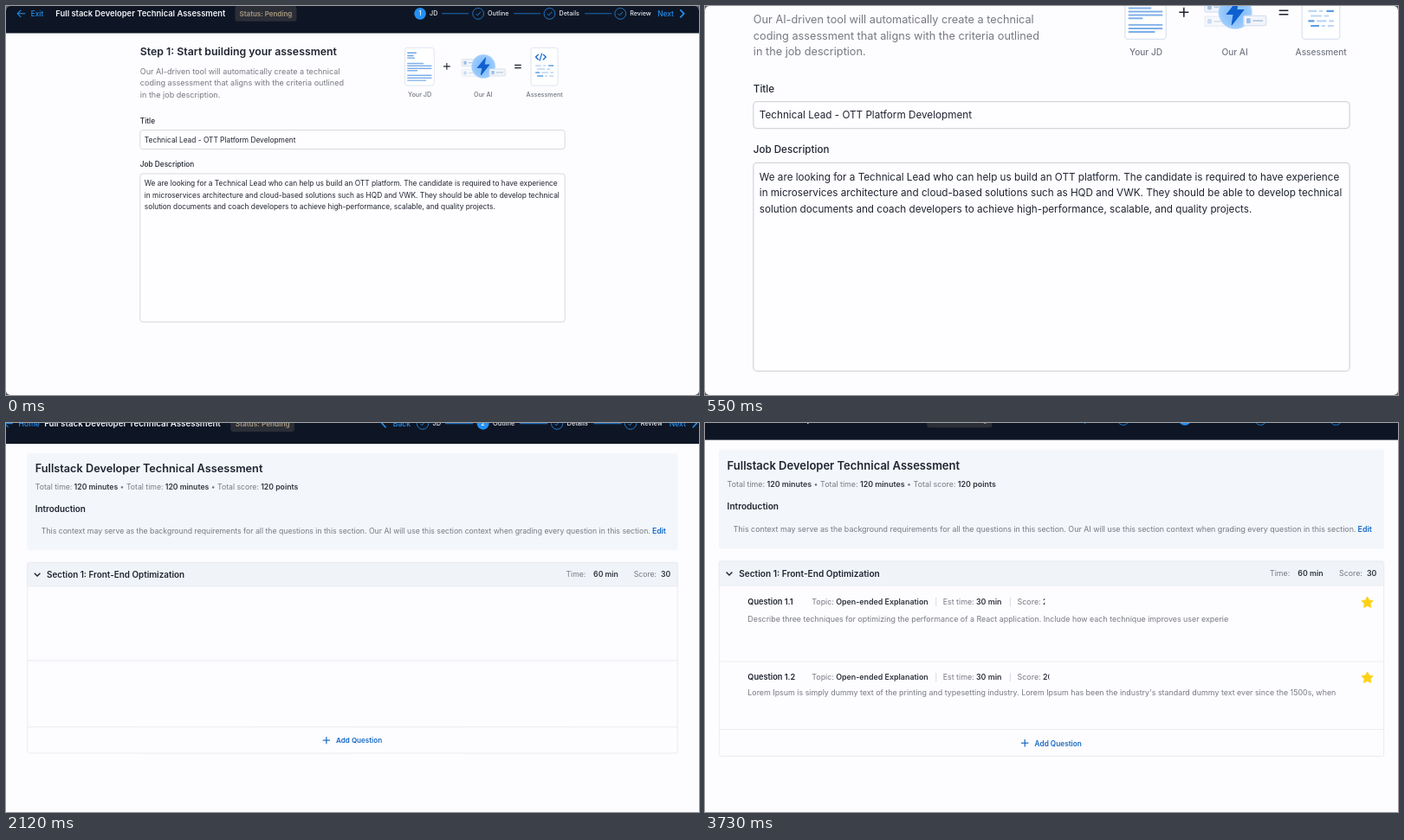
An HTML page with a canvas for the animation above (3760 ms loop, 800x450 px).

```html
<!DOCTYPE html>
<html lang="en">
<head>
<meta charset="utf-8">
<title>Assessment builder</title>
<style>
  html, body { margin: 0; width: 100%; height: 100%; overflow: hidden; background: #fdfcff; }
  canvas { display: block; width: 800px; height: 450px; }
</style>
</head>
<body>
<canvas id="stage" width="800" height="450"></canvas>
<script>
const ctx = document.getElementById('stage').getContext('2d');
const LOOP = 3760, CUT = 1340, WRITE = 2450, NOTICE_END = 3450;
const FINAL_ZOOM = 1.062;
const PAGE = '#fdfcff', INK = '#1f2430', GRAY = '#767a82', BLUE = '#1669c4', BRIGHT = '#2490f2';

// Linear interpolation through [time, value] pairs
function follow(keys, t) {
  for (let i = 1; i < keys.length; i++) {
    const [t0, a] = keys[i - 1], [t1, b] = keys[i];
    if (t < t1) return a + (b - a) * Math.max(0, (t - t0) / (t1 - t0));
  }
  return keys[keys.length - 1][1];
}

function zoomed(scale, draw) {
  ctx.save();
  ctx.translate(400, 225);
  ctx.scale(scale, scale);
  ctx.translate(-400, -225);
  draw();
  ctx.restore();
}

// y is the middle of the capitals; returns the right end
function text(str, x, y, size, color = INK, weight = 400, align = 'left') {
  ctx.font = `${weight} ${size}px Inter, sans-serif`;
  ctx.textAlign = align;
  ctx.fillStyle = color;
  ctx.fillText(str, x, y + size * 0.36);
  return x + ctx.measureText(str).width;
}

// Gray label and strong value on one line
function pair(label, value, x, y, size, gap = 2.3) {
  const end = text(label, x, y, size, GRAY);
  return text(value, end + gap, y, size, '#30343e', 600);
}

function box(x, y, w, h, r, fill, stroke) {
  ctx.beginPath();
  ctx.roundRect(x, y, w, h, r);
  if (fill) { ctx.fillStyle = fill; ctx.fill(); }
  if (stroke) { ctx.strokeStyle = stroke; ctx.lineWidth = 0.9; ctx.stroke(); }
}

function path(points, color, width = 1.2) {
  ctx.beginPath();
  points.forEach(([x, y]) => ctx.lineTo(x, y));
  ctx.strokeStyle = color;
  ctx.lineWidth = width;
  ctx.stroke();
}

function polygon(points, color) {
  ctx.beginPath();
  points.forEach(([x, y]) => ctx.lineTo(x, y));
  ctx.closePath();
  ctx.fillStyle = ctx.strokeStyle = color;
  ctx.lineWidth = 0.8;
  ctx.lineJoin = 'round';
  ctx.fill();
  ctx.stroke();
}

function disc(x, y, r, color) {
  ctx.beginPath();
  ctx.arc(x, y, r, 0, Math.PI * 2);
  ctx.fillStyle = color;
  ctx.fill();
}

function plus(x, y, r, color, width) {
  path([[x - r, y], [x + r, y]], color, width);
  path([[x, y - r], [x, y + r]], color, width);
}

function header(exitLabel, active) {
  ctx.fillStyle = '#0e1625';
  ctx.fillRect(0, -20, 800, 51.6);
  path([[22.5, 9], [13.5, 9]], BRIGHT, 1);
  path([[17.5, 5], [13.5, 9], [17.5, 13]], BRIGHT, 1);
  text(exitLabel, 29, 9, 8.3, BRIGHT, 500);
  text('Full stack Developer Technical Assessment', 57.5, 9, 9.4, '#f1f3f7', 600);
  box(264.5, 0, 71, 18, 3, '#2b2e37');
  text('Status: Pending', 300, 9.5, 7.95, '#a79b80', 600, 'center');
  if (active > 1) {
    path([[437, 4.5], [432.8, 9], [437, 13.5]], BRIGHT, 1.6);
    text('Back', 445, 9, 8.3, BRIGHT, 500);
  }
  ['JD', 'Outline', 'Details', 'Review'].forEach((label, i) => {
    const x = [478, 545, 627.3, 709][i];
    if (i + 1 === active) {
      disc(x, 9, 6.8, BRIGHT);
      text(active, x, 9, 7.2, '#fff', 500, 'center');
    } else {
      ctx.beginPath();
      ctx.arc(x, 9, 6.4, 0, Math.PI * 2);
      ctx.strokeStyle = '#237fd4';
      ctx.lineWidth = 0.9;
      ctx.stroke();
      path([[x - 2.6, 9.2], [x - 0.8, 11], [x + 2.8, 7]], '#2c8ae0', 0.9);
    }
    text(label, x + 11, 9, 7.15, '#e8ebf1', 500);
    if (i < 3) {
      const start = [503, 586, 668][i];
      path([[start, 9], [start + 31, 9]], '#1c6ab9', 1);
    }
  });
  text('Next', 752, 9, 8.3, BRIGHT, 500);
  path([[778, 4.5], [782.4, 9], [778, 13.5]], BRIGHT, 1.6);
}

function snippetCard(x, y, w, alpha) {
  ctx.globalAlpha = alpha;
  box(x, y, w, 8, 1, '#f1f5fb', '#d6e0ee');
  box(x + 2.2, y + 2, 3.4, 4, 0.5, '#9dbfe8');
  path([[x + 7.5, y + 4], [x + w - 2.5, y + 4]], '#b9c8dc', 1.2);
  ctx.globalAlpha = 1;
}

function recipe() {
  box(460.4, 48.5, 33.8, 43.6, 2.5, '#fff', '#dbe4f1');
  [54.4, 57.6, 60.3].forEach((y, i) =>
    path([[463.2, y], [[473.8, 470.5, 472][i], y]], '#6ea5e6', 1.3));
  [66.6, 69.4, 72.3, 74.9, 80.4, 83.3, 86.2].forEach((y, i) =>
    path([[463.2, y], [[482, 491.3, 491.3, 475, 491.3, 491.3, 485][i], y]], '#7fafe8', 1.4));
  plus(508.8, 70, 3.9, INK, 1.1);

  snippetCard(526, 61.8, 18, 1);
  snippetCard(526, 73.5, 17, 0.5);
  const glow = ctx.createRadialGradient(551, 70, 8, 551, 70, 14.5);
  glow.addColorStop(0, '#8cc2fb');
  glow.addColorStop(0.8, '#9fcdfc');
  glow.addColorStop(0.9, '#d5e9fd');
  glow.addColorStop(1, '#e8f3fe00');
  disc(551, 70, 14.5, glow);
  snippetCard(558, 73, 18.3, 1);
  polygon([[553.5, 59.8], [544, 71.6], [549.6, 71.6], [548.2, 80.2], [557.9, 68], [552.2, 68]], '#0e60cf');

  path([[587, 68.5], [594.6, 68.5]], INK, 1.1);
  path([[587, 71.7], [594.6, 71.7]], INK, 1.1);

  box(605.9, 48.5, 31, 43.6, 2.5, '#fff', '#dbe4f1');
  path([[614.6, 56], [611.4, 59.2], [614.6, 62.4]], '#1669d2', 1.4);
  path([[618.6, 54.8], [615.8, 63.6]], '#1669d2', 1.2);
  path([[619.8, 56], [623, 59.2], [619.8, 62.4]], '#1669d2', 1.4);
  [[611, 7, 69], [620, 3, 69], [626, 6, 69], [613, 9, 73], [624, 4, 73],
   [611, 5, 77.2], [618, 8, 77.2], [628, 4, 77.2], [613, 7, 81.2], [622, 3, 81.2], [627, 5, 81.2]]
    .forEach(([x, w, y], i) => path([[x, y], [x + w, y]], i % 3 === 2 ? '#5b9ce6' : '#bcd6f5', 1.5));

  const caption = (str, x) => text(str, x, 102.8, 7.2, '#737984', 500, 'center');
  caption('Your JD', 477.6);
  caption('Our AI', 550.6);
  caption('Assessment', 621.5);
}

function jobPage() {
  header('Exit', 1);
  text('Step 1: Start building your assessment', 155, 53, 12.3, INK, 600);
  ['Our AI-driven tool will automatically create a technical',
   'coding assessment that aligns with the criteria outlined',
   'in the job description.']
    .forEach((line, i) => text(line, 155, 75.6 + i * 13.4, 9.06, GRAY));
  recipe();
  text('Title', 155, 132.7, 8.25, INK, 500);
  box(155, 143.6, 490, 22, 3, '#fefdff', '#d3d6dc');
  text('Technical Lead - OTT Platform Development', 160, 154.7, 8.33);
  text('Job Description', 155, 183, 8.25, INK, 500);
  box(155, 194, 490, 171.5, 3, '#fefdff', '#d3d6dc');
  ['We are looking for a Technical Lead who can help us build an OTT platform. The candidate is required to have experience',
   'in microservices architecture and cloud-based solutions such as HQD and VWK. They should be able to develop technical',
   'solution documents and coach developers to achieve high-performance, scalable, and quality projects.']
    .forEach((line, i) => text(line, 160, 205.4 + i * 13.4, 8.32));
}

// Reveals from the left edge at a steady speed
function wipe(y, speed, elapsed, draw) {
  ctx.save();
  ctx.beginPath();
  ctx.rect(49, y - 9, speed * elapsed, 18);
  ctx.clip();
  draw();
  ctx.restore();
}

function star(cx, cy) {
  polygon(Array.from({ length: 10 }, (_, i) => {
    const r = i % 2 ? 3.6 : 6.9, a = i * Math.PI / 5 - Math.PI / 2;
    return [cx + r * Math.cos(a), cy + r * Math.sin(a)];
  }), '#fcd116');
}

function question(q, elapsed) {
  wipe(q.y, q.metaSpeed, elapsed, () => {
    text(q.name, 49.3, q.y, 9.2, INK, 600);
    pair('Topic:', 'Open-ended Explanation', 123.3, q.y, 8.88);
    path([[266.8, q.y - 5], [266.8, q.y + 5]], '#d5d8dd', 0.9);
    pair('Est time:', '30 min', 274.7, q.y, 8.88);
    path([[352.4, q.y - 5], [352.4, q.y + 5]], '#d5d8dd', 0.9);
    pair('Score:', '20', 360.6, q.y, 8.88);
  });
  wipe(q.bodyY, q.bodySpeed, elapsed, () => text(q.body, 49.3, q.bodyY, 8.9, GRAY));
  star(764.6, q.y + 0.8);
}

const QUESTIONS = [
  { name: 'Question 1.1', y: 207, bodyY: 226.5, metaSpeed: 0.268, bodySpeed: 0.434,
    body: 'Describe three techniques for optimizing the performance of a React application. Include how each technique improves user experience.' },
  { name: 'Question 1.2', y: 294, bodyY: 311.8, metaSpeed: 0.272, bodySpeed: 0.5316,
    body: "Lorem Ipsum is simply dummy text of the printing and typesetting industry. Lorem Ipsum has been the industry's standard dummy text ever since the 1500s, when" }
];

function outlinePage(t) {
  box(16, 31, 768, 114.3, 2, '#f3f6fa');
  text('Fullstack Developer Technical Assessment', 25.6, 49, 13, INK, 600);
  let x = pair('Total time:', '120 minutes', 25.6, 70.5, 8.88);
  x = text(' • ', x, 70.5, 8.88, GRAY);
  x = pair('Total time:', '120 minutes', x, 70.5, 8.88);
  x = text(' • ', x, 70.5, 8.88, GRAY);
  pair('Total score:', '120 points', x, 70.5, 8.88);
  text('Introduction', 25.6, 96.3, 10.1, INK, 600);
  text('This context may serve as the background requirements for all the questions in this section. Our AI will use this section context when grading every question in this section.', 32.8, 122.5, 8.89, GRAY);
  text('Edit', 753.6, 122.5, 8.88, BLUE, 600);

  box(16.4, 160, 767.2, 225.5, 2, PAGE, '#e8ebef');
  box(16.4, 160, 767.2, 28, [2, 2, 0, 0], '#f0f4f9', '#e8ecf1');
  [276, 354.5].forEach(y => path([[16.4, y], [783.6, y]], '#e8ebef', 0.9));
  path([[24.6, 172.6], [28, 176], [31.4, 172.6]], INK, 1.4);
  text('Section 1: Front-End Optimization', 39.2, 174.2, 10.1, INK, 600);
  pair('Time:', '60 min', 652, 173.4, 8.85, 9);
  pair('Score:', '30', 732, 173.4, 8.85, 5);
  plus(369.2, 370.2, 4.2, BLUE, 1.2);
  text('Add Question', 380.6, 370.6, 8.25, BLUE, 600);

  const elapsed = t - WRITE;
  if (elapsed < 0) return;
  QUESTIONS.forEach(q => question(q, elapsed));
  if (t < NOTICE_END) {
    disc(609.5, 51.2, 9, '#1162c4');
    const dots = '.'.repeat(Math.floor(elapsed / 250) % 4);
    text('AI is generating' + dots, 629, 52, 15.4, '#1162c4', 800);
  }
}

function render(t) {
  if (t < CUT) {
    ctx.fillStyle = '#525661';
    ctx.fillRect(0, 0, 800, 450);
    ctx.save();
    box(0, 0, 800, 450, 5, PAGE);
    ctx.clip();
    zoomed(follow([[0, 1], [300, 1.2245], [550, 1.404], [655, 1.4816]], t), jobPage);
    ctx.restore();
  } else {
    ctx.fillStyle = PAGE;
    ctx.fillRect(0, 0, 800, 450);
    const zoom = follow([[1620, 1], [2420, FINAL_ZOOM]], t);
    zoomed(zoom, () => header('Home', 2));
    zoomed(zoom / FINAL_ZOOM, () => outlinePage(t));
  }
}

const started = performance.now();
function tick() {
  render((performance.now() - started) % LOOP);
  requestAnimationFrame(tick);
}
tick();
</script>
</body>
</html>
```
